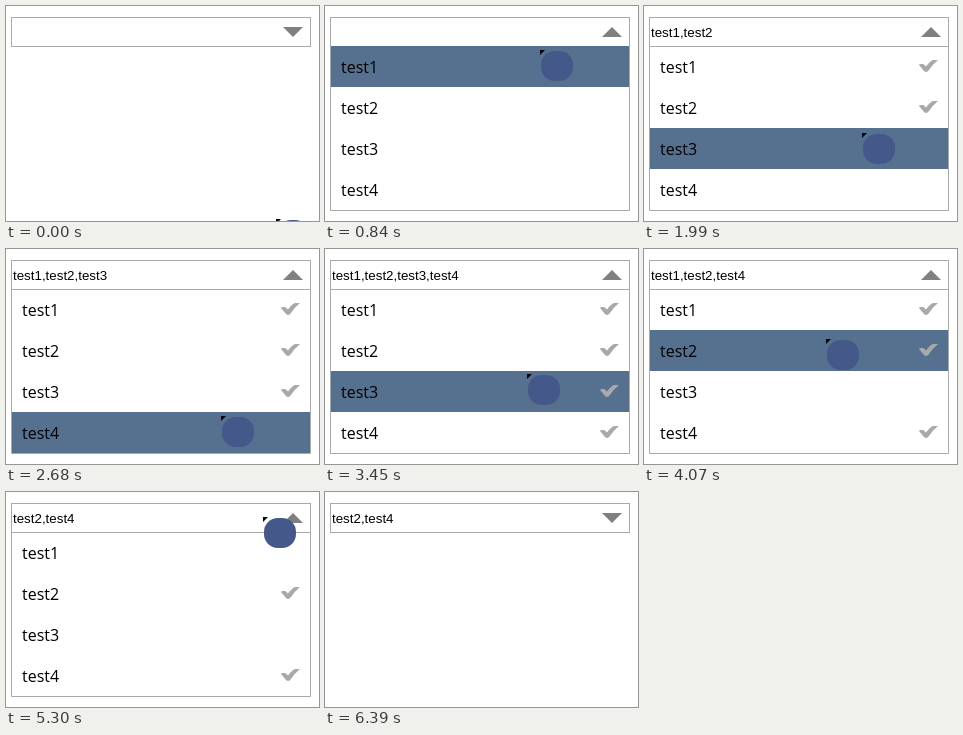
An HTML page that plays this animation: 313 px wide and 215 px high, repeating every 6.64 s.

```html
<!DOCTYPE html>
<html lang="en">
<head>
<meta charset="utf-8">
<title>Multi-select dropdown</title>
<style>
  html, body { margin: 0; width: 100%; height: 100%; overflow: hidden; background: #fff; }
  svg { display: block; }
  .frame { fill: none; stroke: #a9a9a9; }
  .hover { fill: #56708f; }
  .arrow { fill: #808080; }
  .tick { fill: #a9a9a9; }
  .item { font: 16px "Open Sans", "Noto Sans", sans-serif; }
  .value { font: 13.333px "Liberation Sans", Arial, sans-serif; }
</style>
</head>
<body>
<svg width="313" height="215" viewBox="0 0 313 215">
  <rect class="frame" x="5.5" y="11.5" width="299" height="29"/>
  <text class="value" id="value" x="7" y="31"></text>
  <path class="arrow" id="arrow"/>
  <g id="list">
    <path class="frame" d="M5.5 40.5V204.5H304.5V40.5"/>
    <rect class="hover" id="hover" x="6" width="298" height="41"/>
  </g>
  <g id="pointer">
    <rect x="1" y="1" width="32" height="30" rx="14" fill="#44588a"/>
    <path d="M0 0H5L0 5Z"/>
  </g>
</svg>
<script>
const LOOP = 6640, TOP = 40, ROW = 41, COUNT = 4;
const MOVE = 400, TICK = 75;

// Each action clicks whatever is under the pointer, then moves it to x, y
const actions = [
  { at: 0, x: 215, y: 24 },
  { at: 540, x: 215, y: 45, click: "box" },
  { at: 1320, x: 217, y: 99, click: 1 },
  { at: 1840, x: 219, y: 145, click: 2 },
  { at: 2530, x: 212, y: 181, click: 3 },
  { at: 3140, x: 201, y: 121, click: 4 },
  { at: 3910, x: 170, y: 70, click: 3 },
  { at: 4680, x: 257, y: 25, click: 1 },
  { at: 5480, x: 281, y: 161, click: "box" },
  { at: 6090, x: 270, y: 240 }
];

const $ = id => document.getElementById(id);
const show = (el, on) => el.setAttribute("visibility", on ? "visible" : "hidden");
const easeOut = p => 1 - (1 - p) ** 2;

function add(tag, attrs, text = "") {
  const el = document.createElementNS("http://www.w3.org/2000/svg", tag);
  for (const name in attrs) el.setAttribute(name, attrs[name]);
  el.textContent = text;
  return $("list").appendChild(el);
}

const ticks = Array.from({ length: COUNT }, (_, i) => {
  const y = TOP + i * ROW;
  add("text", { class: "item", x: 16, y: y + 27 }, "test" + (i + 1));
  return add("path", {
    class: "tick",
    transform: `translate(275 ${y + 14})`,
    d: "M0 5Q0 4 2 4H4Q5.5 4.5 7 6.5Q11 1 14 0H19Q14 4 10 10Q7.5 13.5 5 11Z"
  });
});

function stateAt(t) {
  let x = 270, y = 213, open = false;
  const chosen = new Set();
  for (const a of actions.filter(a => t >= a.at)) {
    if (a.click === "box") open = !open;
    else if (a.click && !chosen.delete(a.click)) chosen.add(a.click);
    const elapsed = Math.floor((t - a.at) / TICK) * TICK;
    const p = easeOut(Math.min(1, elapsed / MOVE));
    x += (a.x - x) * p;
    y += (a.y - y) * p;
  }
  return { x: Math.round(x), y: Math.round(y), open, chosen };
}

function draw(t) {
  const { x, y, open, chosen } = stateAt(t);
  const row = Math.floor((y - TOP) / ROW);

  $("pointer").setAttribute("transform", `translate(${x} ${y})`);
  $("value").textContent = [...chosen].sort().map(n => "test" + n).join(",");
  $("arrow").setAttribute("d", open ? "M277 31H297L287 21Z" : "M277 21H297L287 31Z");
  $("list").style.display = open ? "" : "none";
  show($("hover"), row >= 0 && row < COUNT);
  $("hover").setAttribute("y", TOP + row * ROW);
  ticks.forEach((tick, i) => show(tick, chosen.has(i + 1)));
}

const began = performance.now();
function frame() {
  draw((performance.now() - began) % LOOP);
  requestAnimationFrame(frame);
}
frame();
</script>
</body>
</html>
```
